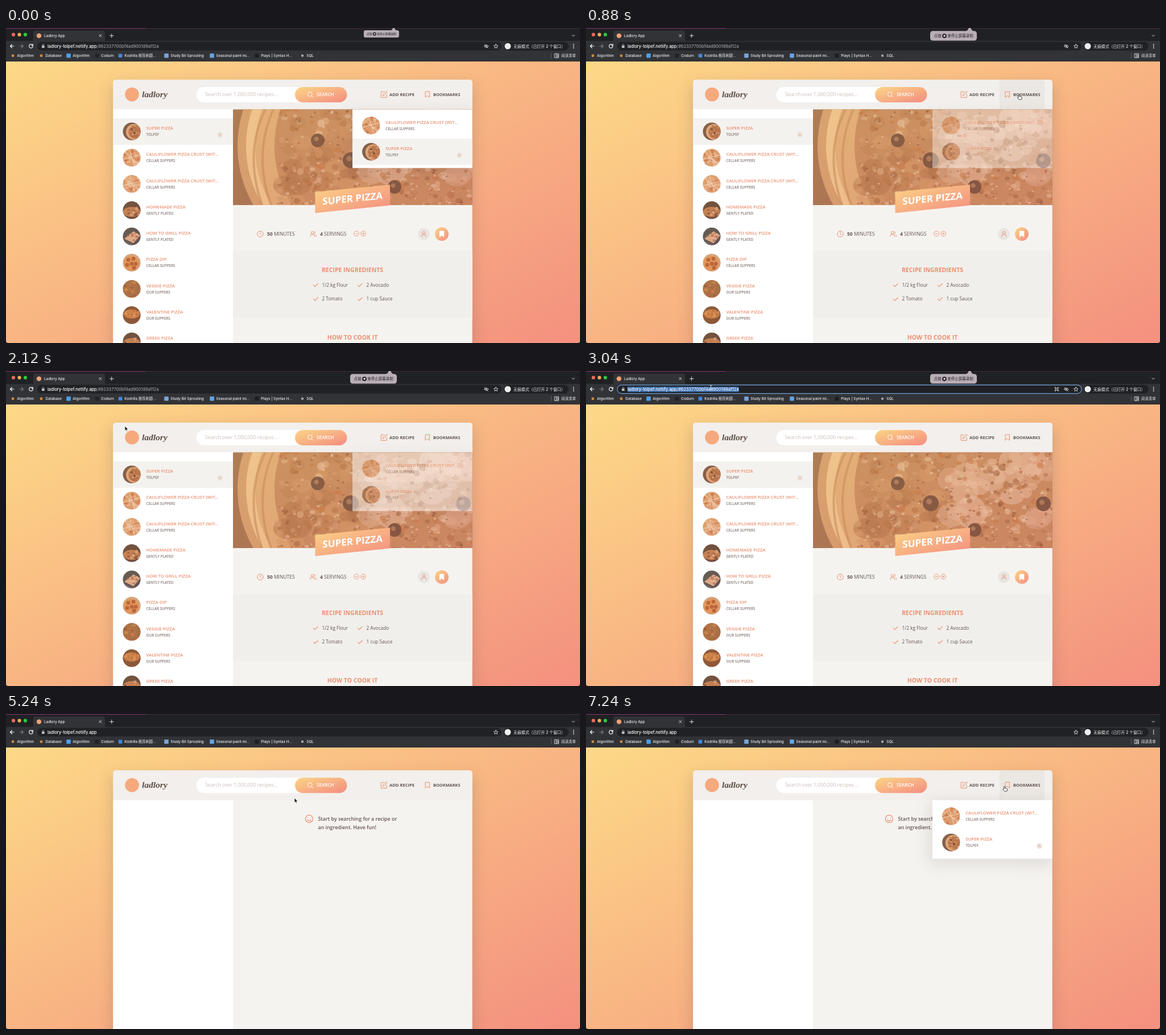
Recreate the animation shown at these times as an HTML page. Size 1009 by 555 pixels, loop 7740 ms.

```html
<!DOCTYPE html>
<html lang="en">
<head>
<meta charset="utf-8">
<title>Recipe app demo</title>
<style>
html, body { margin: 0; width: 100%; height: 100%; overflow: hidden; background: #151517; }
svg { display: block; width: 1009px; height: 555px; }
text { white-space: pre; }
.ui { font-family: Inter, "Noto Sans CJK SC", "Noto Sans CJK", sans-serif; font-weight: 500; }
.page { font-family: "Open Sans", "Noto Sans", sans-serif; }
.line { fill: none; stroke-linecap: round; stroke-linejoin: round; }
</style>
</head>
<body>
<svg id="stage" viewBox="0 0 1009 555" xmlns="http://www.w3.org/2000/svg"></svg>
<script>
const LOOP = 7740, LOAD = 4640;
const ORANGE = '#ea8f6f', BROWN = '#615551', PALE = '#f5f3f0', WHITE = '#eeeff1';
const HOST = 'ladlory-tolpef.netlify.app', HASH = '/#62337700bf4ad900189a112a';
const stage = document.getElementById('stage');

let seed = 7;
const rnd = () => (seed = (seed * 16807) % 2147483647) / 2147483647;
const pick = list => list[Math.floor(rnd() * list.length)];

const text = (x, y, s, size, fill, weight = 500, more = '') =>
  `<text x="${x}" y="${y}" font-size="${size}" fill="${fill}" font-weight="${weight}" ${more}>${s}</text>`;
const rect = (x, y, w, h, fill, r = 0, more = '') =>
  `<rect x="${x}" y="${y}" width="${w}" height="${h}" fill="${fill}" rx="${r}" ${more}/>`;
const disc = (x, y, r, fill, more = '') => `<circle cx="${x}" cy="${y}" r="${r}" fill="${fill}" ${more}/>`;
const oval = (x, y, rx, ry, fill, more = '') => `<ellipse cx="${x}" cy="${y}" rx="${rx}" ry="${ry}" fill="${fill}" ${more}/>`;
const line = (d, color, w = 1, more = '') =>
  `<path class="line" d="${d}" stroke="${color}" stroke-width="${w}" ${more}/>`;
const ring = (x, y, r, color, w = 1) => disc(x, y, r, 'none', `stroke="${color}" stroke-width="${w}"`);
const group = (id, body, more = '') => `<g id="${id}" ${more}>${body}</g>`;

function blotches(n, x, y, w, h, size, colors) {
  let out = '';
  while (n--) {
    const r = size * (0.25 + rnd() * 0.75);
    out += oval((x + rnd() * w).toFixed(1), (y + rnd() * h).toFixed(1), r.toFixed(1),
      (r * (0.5 + rnd() * 0.6)).toFixed(1), pick(colors), 'opacity=".55"');
  }
  return out;
}

const TOPPING = ['#a8673a', '#dfae88', '#945835', '#e8c2a4', '#c06c39', '#cc966c'];

const thumbs = {
  whole: () => disc(0, 0, 16, '#70503f') + disc(4, 1, 14, '#dba476') + disc(6, 1, 11.5, '#b06c40') +
    blotches(30, -4, -10, 19, 21, 2.6, TOPPING) + disc(0, -4, 1.5, '#4c352b') + disc(5, 3, 1.7, '#4c352b'),
  sliced: () => disc(0, 0, 16, '#d99a6b') + blotches(30, -15, -15, 30, 30, 4, ['#efc8a2', '#c97544', '#bb5f38', '#f3d5b8']) +
    line('M-15 3L15-5M-4-15L5 15M-12-10L12 11', '#f6e3ce', 0.9),
  loaf: () => disc(0, 0, 16, '#5b4033') + oval(0, 3, 15, 9, '#bb774a') +
    blotches(26, -13, -5, 26, 15, 3, ['#ecc398', '#74422c', '#f0d8b8', '#cd7c44', '#633a2a']),
  grill: () => disc(0, 0, 16, '#4b494b') + `<path d="M-13 4L3-9L15-2L3 12Z" fill="#d9a684"/>` +
    blotches(20, -8, -5, 18, 12, 2.4, ['#f0d4ba', '#b8664a', '#964d35']) + line('M-15 8L0 15M-15 12L-5 16', '#77757a'),
  dip: () => disc(0, 0, 16, '#cfa07c') + disc(-1, 1, 13, '#dd9150') +
    [[-6, -5], [3, -7], [7, 2], [-8, 4], [0, 2], [4, 9]].map(p => disc(...p, 3.4, '#b2592f')).join(''),
  veggie: () => disc(0, 0, 16, '#a2643a') + blotches(38, -14, -12, 28, 26, 3.4, ['#d3924f', '#794928', '#b9673e', '#847042']),
  crust: () => disc(0, 0, 16, '#7b492c') + oval(0, -2, 14, 8, '#c97c41') +
    blotches(22, -12, -8, 24, 11, 2.8, ['#e2a562', '#a0562b', '#b8763d'])
};
const thumb = (x, y, kind) => `<g transform="translate(${x} ${y})" clip-path="url(#round)">${thumbs[kind]()}
  ${disc(0, 0, 16, 'url(#warm)', 'opacity=".15"')}</g>`;

const person = (x, y, k, color) => line(`M${x - 3.4 * k} ${y + 4 * k}v${-k}q0 ${-2.2 * k} ${2.2 * k} ${-2.2 * k}h${2.4 * k}q${2.2 * k} 0 ${2.2 * k} ${2.2 * k}v${k}`, color, 0.9 * k) +
  ring(x, y - 2 * k, 2.1 * k, color, 0.9 * k);
const badge = (x, y) => disc(x, y, 5, '#ebe6e2') + person(x, y, 0.55, ORANGE);
const row = (x, y, kind, title, by) => thumb(x, y, kind) +
  text(x + 25.5, y - 3, title, 7.75, ORANGE, 600) + text(x + 25.5, y + 8, by, 6.3, '#847874', 600);

const CRUST = 'CAULIFLOWER PIZZA CRUST (WIT...';
const recipes = [
  ['whole', 'SUPER PIZZA', 'TOLPEF'], ['sliced', CRUST, 'CELLAR SUPPERS'], ['sliced', CRUST, 'CELLAR SUPPERS'],
  ['loaf', 'HOMEMADE PIZZA', 'GENTLY PLATED'], ['grill', 'HOW TO GRILL PIZZA', 'GENTLY PLATED'],
  ['dip', 'PIZZA DIP', 'CELLAR SUPPERS'], ['veggie', 'VEGGIE PIZZA', 'OUR SUPPERS'],
  ['crust', 'VALENTINE PIZZA', 'OUR SUPPERS'], ['loaf', 'GREEK PIZZA', 'OUR SUPPERS']
];

function photo() {
  const olive = (x, y, r) => disc(x, y, r, '#6b4534') + disc(x - r * 0.2, y - r * 0.2, r * 0.35, '#9c6e52');
  return `<g clip-path="url(#photoBox)">${rect(399, 143, 421, 169, '#9a6747')}
    <g filter="url(#soft)">
    ${oval(645, 208, 238, 222, '#cf9768')}${oval(652, 208, 230, 214, '#ecc08c')}${oval(660, 210, 222, 208, '#dca673')}
    ${line('M456 143Q418 220 450 312M470 143Q434 225 466 312', '#bd8153', 4, 'opacity=".6"')}
    ${oval(672, 208, 200, 198, '#c08358')}
    ${blotches(30, 480, 150, 150, 160, 26, ['#a96a41', '#cf9361', '#b5764a'])}
    ${blotches(40, 640, 150, 175, 120, 28, ['#e0b296', '#d9a383', '#e5bca2'])}
    ${blotches(240, 478, 140, 345, 175, 7, TOPPING)}${blotches(260, 478, 140, 345, 175, 3, ['#80492d', '#f0d2b6', '#a05a35'])}
    ${olive(548, 198, 12)}${olive(606, 233, 14)}${olive(804, 234, 13)}${olive(683, 280, 12)}</g>
    ${rect(399, 143, 421, 169, 'url(#warm)', 0, 'opacity=".2"')}</g>`;
}

const bookmarkIcon = (x, y, color, fill = 'none') =>
  `<path d="M${x - 3.7} ${y - 5}h7.4v10.2l-3.7-3l-3.7 3Z" fill="${fill}" stroke="${color}" stroke-linejoin="round"/>`;

const header = () => rect(188, 91, 632, 52.5, '#f2efec') + rect(727, 91, 79, 52.5, '#ebe7e3', 0, 'id="hover"') +
  disc(221.5, 117, 12.3, '#f5a97d') +
  text(239, 121.5, 'ladlory', 15.5, '#5d4c46', 700, 'font-style="italic" font-family="Liberation Serif, serif"') +
  rect(334.5, 104, 265, 27, '#fff', 13.5) + text(350, 120, 'Search over 1,000,000 recipes...', 8.75, '#cbbfba', 400) +
  rect(508, 104, 91.5, 27, 'url(#warm)', 13.5) + ring(534.3, 116.6, 3.8, '#fff') + line('M537.2 119.5l2.4 2.5', '#fff') +
  text(546, 120, 'SEARCH', 8.1, '#fff', 600) +
  line('M664 112.3h-4.8v10h10v-4.8M662.5 119l.6-2.6l5.3-5.3l1.8 1.8l-5.3 5.3Z', ORANGE) + text(674, 119.6, 'ADD RECIPE', 7.6, BROWN, 700) +
  bookmarkIcon(740.7, 117, ORANGE) + text(751, 119.6, 'BOOKMARKS', 7.4, BROWN, 700);

const recipe = () => rect(188, 143, 211, 420, '#fff') + rect(188, 159.3, 211, 46.5, '#f4f2ef') +
  recipes.map((r, i) => row(221, 182.2 + 46.25 * i, ...r)).join('') + badge(376, 188.3) +
  photo() +
  `<path d="M543.5 289L675 276V312.5L543.5 326Z" fill="url(#warm)"/>` +
  text(0, 6, 'SUPER PIZZA', 17, '#fff', 700, 'text-anchor="middle" transform="translate(609.2 300.3) skewY(-5.7)"') +
  ring(447, 363, 5.2, ORANGE) + line('M447 360v3.2l2 1.2', ORANGE, 0.9) +
  text(459, 365.6, '<tspan font-weight="700">50</tspan> MINUTES', 8.5, BROWN, 400) +
  person(538.6, 363, 1.1, ORANGE) + line('M542 358.2q3 1.8 0 4.4M544 364q1.5 .8 1.5 3.4', ORANGE) +
  text(552, 365.6, '<tspan font-weight="700">4</tspan> SERVINGS', 8.5, BROWN, 400) +
  ring(616, 362.3, 4.4, ORANGE, 0.9) + ring(628, 362.3, 4.4, ORANGE, 0.9) + line('M614 362.3h4M626 362.3h4M628 360.3v4', ORANGE, 0.9) +
  disc(734.5, 363, 10.5, '#e9e5e2') + person(734.5, 363, 1.1, ORANGE) +
  disc(766, 363, 12, 'url(#warm)') + bookmarkIcon(766, 363, '#fff', '#fff') +
  rect(399, 393.5, 421, 117, '#f1efec') + text(609, 430, 'RECIPE INGREDIENTS', 10.5, ORANGE, 700, 'text-anchor="middle"') +
  [[540, 453, '1/2 kg Flour'], [618, 453, '2 Avocado'], [540, 477.6, '2 Tomato'], [618, 477.6, '1 cup Sauce']].map(([x, y, s]) =>
    line(`M${x + 0.5} ${y}l2.6 2.6l5.2-5.2`, ORANGE, 1.1) + text(x + 15.5, y + 2.8, s, 8.25, BROWN, 500)).join('') +
  text(609, 548.5, 'HOW TO COOK IT', 10.5, ORANGE, 700, 'text-anchor="middle"');

const welcome = () => rect(188, 143.5, 211, 420, '#fff') + ring(532.8, 176.5, 6.6, ORANGE, 1.2) +
  line('M529.7 178.2q3.1 3.6 6.2 0M530.5 174.5v.2M535 174.5v.2', ORANGE, 1.2) +
  text(548.5, 180, 'Start by searching for a recipe or', 8.85, BROWN, 600) + text(548.5, 194.3, 'an ingredient. Have fun!', 8.85, BROWN, 600);

const dropdown = () => rect(601, 146, 222, 114, BROWN, 8, 'opacity=".12" filter="url(#shade)"') +
  rect(609, 143.5, 211, 103.2, '#fff') + rect(609, 195, 211, 46.3, '#f4f2ef', 0, 'id="active"') +
  row(641.7, 171.8, 'sliced', CRUST, 'CELLAR SUPPERS') + row(641.7, 218, 'whole', 'SUPER PIZZA', 'TOLPEF') + badge(797, 224.3);

// Icon centre, label, icon colour, icon size.
const marks = [
  [12, 'Algorithm', '#c98a45', 4.4], [62, 'Database', '#c98a45', 4.4], [110, 'Algorithm', '#4f9fe6', 7.6],
  [160, 'Codurn', '#202226', 7], [201, 'Kodrilla 推荐刷题...', '#4687d8', 6.6], [282, 'Study Bit Sprouting', '#7ba4d6', 7.6],
  [362, 'Seasonal paint mi...', '#64a3e3', 7.6], [441, 'Plays | Syntax H...', '#1d1e21', 7], [521, 'SQL', '#a4a7ac', 4]
];
const mark = ([x, s, color, size]) => rect(x - size / 2, 48.7 - size / 2, size, size, color, 1) + text(x + 7.3, 51, s, 6.35, WHITE);

const browser = () => rect(0, 0, 1009, 59, '#202124') + rect(0, 0, 1009, 1, '#42283f') + rect(0, 0, 245, 1, '#8c3477') +
  disc(13, 11.7, 3.1, '#ed6a5e') + disc(23.5, 11.7, 3.1, '#f0ac4b') + disc(34, 11.7, 3.1, '#2bc840') +
  rect(48, 4.5, 126, 25, '#323337', 4) + rect(0, 22.7, 1009, 36, '#323337') +
  disc(58, 13.6, 4.2, '#f3a072', 'id="favicon"') + text(67, 16, 'Ladlory App', 6.3, WHITE) +
  line('M163.8 11.5l4 4m0-4l-4 4M182.5 13.6h6.4m-3.2-3.2v6.4M995 12.4l2.2 2.2l2.2-2.2', WHITE, 0.9) +
  line('M14 32H7.5m3-3l-3 3l3 3', '#fff', 1.1) + line('M23.8 32h6.5m-3-3l3 3l-3 3', '#7c7e82', 1.1) +
  group('reload', line('M46.6 30a3.3 3.3 0 1 0 .6 2.4M47.3 28.6v2.3h-2.3', '#fff', 1.1)) +
  group('stop', line('M41.5 29.5l5 5m0-5l-5 5', '#fff', 1.1)) +
  rect(55, 24.6, 816, 15, '#202124', 7.5, 'id="omnibox" stroke-width="1.1"') +
  group('lock', rect(63, 31, 4.6, 4, '#bdc1c6', 0.6) + line('M64 31v-1.2a1.3 1.3 0 0 1 2.6 0V31', '#bdc1c6', 0.8)) +
  group('info', ring(65.2, 32, 3, '#bdc1c6', 0.8) + line('M65.2 32v1.4M65.2 30.5v.1', '#bdc1c6', 0.8)) +
  rect(73, 27.8, 0, 9, '#3f73b5', 0, 'id="select"') +
  text(73, 34.6, '<tspan id="host"></tspan><tspan id="path"></tspan>', 7.35, '#fff', 500, 'id="url"') + rect(0, 28, 0.7, 8.4, '#fff', 0, 'id="caret"') +
  group('command', line('M826 30.5h3v3h-3zM826 30.5h-1a1 1 0 1 1 1-1zm3 0v-1a1 1 0 1 1 1 1zm0 3h1a1 1 0 1 1-1 1zm-3 0v1a1 1 0 1 1-1-1z', WHITE, 0.7)) +
  group('eye', line('M840.5 32.2q3.8-4.6 7.6 0q-3.8 4.2-7.6 0M841.3 29l6 6.4', WHITE, 0.9) + disc(844.3, 32, 1.1, WHITE)) +
  line('M861.2 28.4l1.1 2.5l2.7.2l-2.1 1.7l.7 2.7l-2.4-1.5l-2.4 1.5l.7-2.7l-2.1-1.7l2.7-.2Z', WHITE, 0.8) +
  rect(875, 24.5, 114, 15.2, '#202124', 7.6) + disc(882, 32, 5.5, '#eceef0') + text(892, 34.7, '无痕模式（已打开 2 个窗口）', 6.9, WHITE) +
  [29, 32, 35].map(y => disc(997.7, y, 0.9, WHITE)).join('') +
  marks.map(mark).join('') +
  rect(958, 44, 0.7, 9.5, '#6b6d72') + line('M964.5 45.3h7v7h-7zM967 45.3v7M968.5 47.4h2M968.5 49h2M968.5 50.6h2', WHITE, 0.8) +
  text(976, 51.1, '阅读清单', 6.4, WHITE);

const suggest = () => `<path d="M53 40H873.5V80q0 4-4 4H57q-4 0-4-4Z" fill="#241e1c"/>` + rect(53, 42, 820.5, 18, '#3a3b3f') + rect(53, 42, 1.5, 18, '#8ab4f8') +
  disc(65, 51, 4, '#f3a072') + text(79, 53.6, `Ladlory App <tspan fill="#9aa0a6">-</tspan> <tspan fill="#8ab4f8">https://${HOST}</tspan>`, 7.35, WHITE) +
  line('M861.3 49l4 4m0-4l-4 4', WHITE, 0.8) + ring(64.5, 69.3, 2.3, WHITE, 0.9) + line('M66.2 71l2 2', WHITE, 0.9) +
  text(79, 72.6, `https://${HOST}<tspan fill="#9aa0a6"> - Quelio 搜索</tspan>`, 7.35, WHITE);

const notice = () => `<path d="M667 6Q671 5 673-.5H676Q678 5 682 6Z" fill="#b9aeb6"/>` + rect(605, 5.3, 82, 17, '#b9aeb6', 4.5) +
  text(611.5, 16.3, '点按', 6.6, '#242126') + disc(630, 13.8, 3.9, '#242126') + rect(628.5, 12.3, 3, 3, '#e8e2e6', 0.4) +
  text(635.3, 16.3, '来停止屏幕录制', 6.5, '#242126');

stage.innerHTML = `<defs>
  <linearGradient id="warm" x2="1" y2="1"><stop stop-color="#fbd586"/><stop offset="1" stop-color="#f48c81"/></linearGradient>
  <linearGradient id="wall" x2="1" y2="1"><stop stop-color="#fdd987"/><stop offset="1" stop-color="#f4907f"/></linearGradient>
  <filter id="soft"><feGaussianBlur stdDeviation=".7"/></filter>
  <filter id="shade" x="-30%" y="-30%" width="160%" height="160%"><feGaussianBlur stdDeviation="12"/></filter>
  <clipPath id="round"><circle r="15.6"/></clipPath>
  <clipPath id="photoBox"><rect x="399" y="143.5" width="421" height="168.5"/></clipPath>
  <clipPath id="card"><rect x="188.3" y="91" width="631.4" height="480" rx="4.7"/></clipPath>
  <clipPath id="view"><rect y="30" width="1009" height="525" rx="4"/></clipPath></defs>
  <g class="page" clip-path="url(#view)">${rect(0, 58.5, 1009, 497, 'url(#wall)')}
  <g id="sheet">${rect(185, 99, 638, 620, BROWN, 8, 'opacity=".22" filter="url(#shade)"')}
  <g clip-path="url(#card)">${rect(188, 91, 632, 480, PALE)}${header()}
  ${group('recipe', recipe())}${group('welcome', welcome())}${group('dropdown', dropdown())}</g></g></g>
  <g class="ui">${browser()}${group('suggest', suggest())}${group('notice', notice())}</g>
  <g id="cursor">
  <path id="arrow" d="M0 0V8.2L1.9 6.5L3.1 9.2L4.5 8.6L3.3 5.9H5.8Z" fill="#111" stroke="#fff" stroke-width=".7"/>
  <path id="hand" d="M-.9.8Q0-.6.9.8V3.6L4.5 4.5Q5.4 4.8 5.2 6L4.5 9H.1L-2.6 5.6Q-2.6 4.2-.9 5.2Z" fill="#fff" stroke="#222" stroke-width=".8"/>
  <path id="beam" class="line" d="M-1.6-4Q0-4 0-3Q0-4 1.6-4M0-3V3M-1.6 4Q0 4 0 3Q0 4 1.6 4M-1 .8H1" stroke="#e6e6e6" stroke-width=".8"/></g>`;

const el = {};
stage.querySelectorAll('[id]').forEach(n => el[n.id] = n);
const show = (name, on) => el[name].setAttribute('display', on ? 'inline' : 'none');
const clamp = v => Math.max(0, Math.min(1, v));

// The CSS "ease" curve, solved by bisection.
function ease(x) {
  const bez = (s, a, b) => 3 * s * (1 - s) ** 2 * a + 3 * s * s * (1 - s) * b + s ** 3;
  let lo = 0, hi = 1;
  for (let i = 0; i < 18; i++) {
    const mid = (lo + hi) / 2;
    if (bez(mid, 0.25, 0.25) < x) lo = mid; else hi = mid;
  }
  return bez(lo, 0.1, 1);
}

const fades = [[60, 0], [755, 1], [1980, 0], [5840, 1]];
function menuOpacity(t) {
  let v = 1;
  for (const [at, to] of fades) if (t >= at) v += (to - v) * ease(clamp((t - at) / 500));
  return v;
}

const track = [
  [200, 690, 25], [555, 761, 117], [1200, 761, 117], [1460, 690, 205], [1780, 590, 180], [2080, 209, 97], [2160, 209, 97],
  [2440, 219.5, 29], [4860, 219.5, 29], [5200, 507, 148], [5280, 507, 148], [5640, 722, 129], [5760, 748, 125],
  [6480, 748, 125], [6900, 735.5, 127]
];
function pointer(t) {
  let a = track[0];
  for (const b of track) {
    if (t < b[0]) {
      const k = clamp((t - a[0]) / (b[0] - a[0] || 1)), s = k * k * (3 - 2 * k);
      return [a[1] + (b[1] - a[1]) * s, a[2] + (b[2] - a[2]) * s];
    }
    a = b;
  }
  return [a[1], a[2]];
}

let address = '';
function setAddress(host, path, color) {
  const next = host + path + color;
  if (next === address) return;
  address = next;
  el.host.textContent = host;
  el.path.textContent = path;
  el.path.setAttribute('fill', color);
}

function draw(t) {
  const loaded = t >= LOAD, loading = t >= 4320 && !loaded, dy = loaded ? 8.3 : 0;
  const focused = t >= 2560 && t < 4320, selected = t >= 2560 && t < 3280;
  el.sheet.setAttribute('transform', `translate(0 ${dy})`);
  show('recipe', !loaded);
  show('welcome', loaded);
  show('active', !loaded);

  const menu = menuOpacity(t), [x, y] = pointer(t);
  el.dropdown.setAttribute('opacity', menu);
  show('dropdown', menu > 0.002);

  const onButton = t >= 200 && x > 727 && x < 806 && y > 91 + dy && y < 143 + dy;
  const onMenu = menu > 0.3 && x > 609 && x < 820 && y > 143 + dy && y < 247 + dy;
  const typing = t >= 2400 && t < 4300;
  show('hover', onButton);
  show('cursor', t >= 200);
  el.cursor.setAttribute('transform', `translate(${x} ${y})`);
  show('hand', onButton || onMenu);
  show('beam', typing);
  show('arrow', !onButton && !onMenu && !typing);

  if (t < 2560) setAddress(HOST, HASH, '#9aa0a6');
  else if (selected) setAddress(HOST, HASH, '#fff');
  else if (t < 3700) setAddress('https://' + HOST, HASH, '#fff');
  else if (t < 4320) setAddress('https://' + HOST, '', '#fff');
  else setAddress(HOST, '', '#fff');
  const width = focused ? el.url.getComputedTextLength() : 0;
  el.select.setAttribute('width', selected ? width : 0);
  el.caret.setAttribute('x', 73.5 + width);
  show('caret', focused && !selected);
  el.omnibox.setAttribute('stroke', focused ? '#6c9fd6' : 'none');

  show('lock', t < 3280 || loaded);
  show('info', t >= 3280 && !loaded);
  show('reload', !loading);
  show('stop', loading);
  show('favicon', !loading);
  show('command', t >= 2560 && !loaded);
  show('eye', !loaded);

  el.suggest.setAttribute('opacity', 1 - clamp((t - 4280) / 200));
  show('suggest', t >= 3700 && t < 4480);

  const grow = 0.756 + 0.244 * ease(clamp(t / 240));
  el.notice.setAttribute('transform', `translate(${703 * (1 - grow)} 0) scale(${grow})`);
  show('notice', t < 4720);
}

const start = performance.now();
function frame() {
  draw((performance.now() - start) % LOOP);
  requestAnimationFrame(frame);
}
frame();
</script>
</body>
</html>
```
